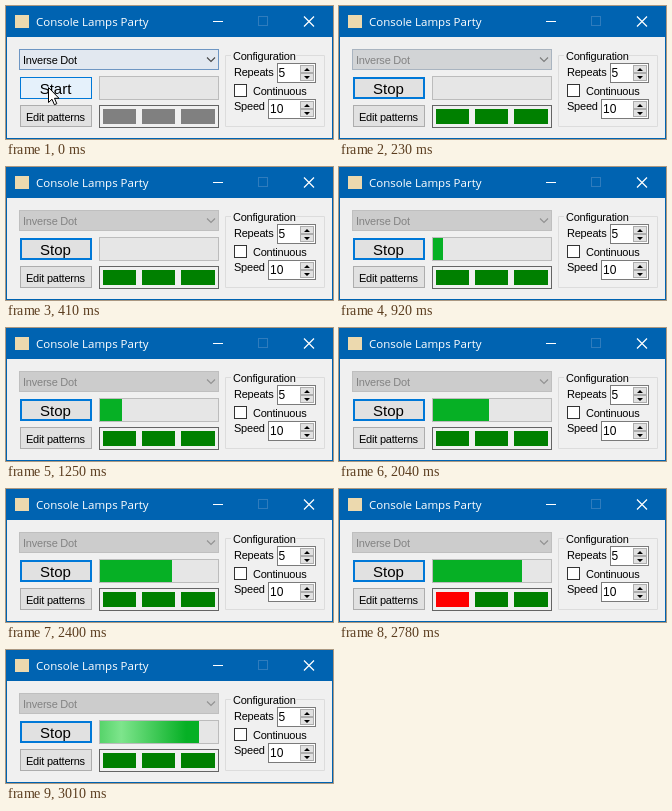
Recreate the animation shown at these times as an HTML page. Size 327 px wide and 133 px high, loop 3060 ms.

```html
<!DOCTYPE html>
<html lang="en">
<head>
<meta charset="utf-8">
<title>Console Lamps Party</title>
<style>
  html, body { margin: 0; width: 100%; height: 100%; overflow: hidden; background: #f0f0f0; }
  svg { display: block; width: 327px; height: 133px; }
  text { font: 11px "Liberation Sans", Arial, sans-serif; letter-spacing: -.22px; fill: #000; }
  .title { font: 11.5px "Open Sans", "Noto Sans", sans-serif; letter-spacing: 0; fill: #fff; }
  .run { font-size: 15px; letter-spacing: 0; text-anchor: middle; }
  .value { font-size: 12px; letter-spacing: 0; }
  .button { fill: #e1e1e1; stroke: #adadad; }
  .field { fill: #fff; stroke: #7a7a7a; }
</style>
</head>
<body>
<svg viewBox="0 0 327 133">
  <defs>
    <linearGradient id="glow">
      <stop offset="0" stop-color="#9cf2a6" stop-opacity="0"/>
      <stop offset=".5" stop-color="#9cf2a6" stop-opacity=".8"/>
      <stop offset="1" stop-color="#9cf2a6" stop-opacity="0"/>
    </linearGradient>
    <clipPath id="barClip"><rect id="barMask" x="94" y="71" width="0" height="22"/></clipPath>
    <g id="spinner">
      <rect class="button" x=".5" y=".5" width="13" height="7"/>
      <rect class="button" x=".5" y="8.5" width="13" height="7"/>
      <path d="M4 6L7 3L10 6ZM4 11L7 14L10 11Z"/>
    </g>
  </defs>

  <!-- window -->
  <rect width="327" height="133" fill="#0063b1"/>
  <rect x="1" y="31" width="325" height="101" fill="#f0f0f0"/>
  <rect x="9" y="9" width="14" height="13" fill="#ecd9ae"/>
  <text class="title" x="30" y="20">Console Lamps Party</text>
  <path d="M207 15.5H217M298 10.5L308 20.5M308 10.5L298 20.5" stroke="#fff" stroke-width="1.2" fill="none"/>
  <rect x="252.5" y="10.5" width="9" height="9" stroke="#2f7cbd" fill="none"/>

  <!-- pattern list -->
  <rect id="combo" x="13.5" y="43.5" width="199" height="20"/>
  <text id="comboText" x="17" y="58">Inverse Dot</text>
  <path id="arrow" d="M201 51.5L205 55.5L209 51.5" fill="none" stroke-width="1.1"/>

  <!-- buttons -->
  <rect id="face" x="14" y="71" width="72" height="22" fill="#0078d7"/>
  <rect id="run"/>
  <text id="runText" class="run" x="49.5" y="88"></text>
  <rect class="button" x="14.5" y="99.5" width="71" height="21"/>
  <text x="20" y="115">Edit patterns</text>

  <!-- progress -->
  <rect x="93.5" y="70.5" width="119" height="23" fill="#e6e6e6" stroke="#bcbcbc"/>
  <g clip-path="url(#barClip)">
    <rect x="94" y="71" width="118" height="22" fill="#06b025"/>
    <rect id="shine" y="71" width="130" height="22" fill="url(#glow)"/>
  </g>

  <!-- lamps -->
  <rect x="93.5" y="99.5" width="119" height="22" fill="#f0f0f0" stroke="#646464"/>
  <rect class="lamp" x="97" y="103" width="33" height="15"/>
  <rect class="lamp" x="136" y="103" width="33" height="15"/>
  <rect class="lamp" x="175" y="103" width="34" height="15"/>

  <!-- configuration -->
  <path d="M225 49.5H219.5V120.5H318.5V49.5H290" fill="none" stroke="#dcdcdc"/>
  <text x="227" y="54">Configuration</text>
  <text x="228" y="70">Repeats</text>
  <rect class="field" x="271.5" y="57.5" width="38" height="19"/>
  <text class="value" x="272.5" y="71">5</text>
  <use href="#spinner" x="294" y="59"/>
  <rect x="228.5" y="78.5" width="12" height="12" fill="#fff" stroke="#333"/>
  <text x="247" y="89">Continuous</text>
  <text x="228" y="104">Speed</text>
  <rect class="field" x="262.5" y="93.5" width="47" height="19"/>
  <text class="value" x="264" y="107">10</text>
  <use href="#spinner" x="294" y="95"/>

  <path id="pointer" d="M42.5 81.5V96.5L46 93.2L48.4 98.7L50.8 97.7L48.5 92.3H53Z" fill="#fff" stroke="#000"/>
</svg>
<script>
  const LOOP = 3060, START = 50;
  const $ = id => document.getElementById(id);
  const set = (id, name, value) => $(id).setAttribute(name, value);
  const lamps = document.querySelectorAll('.lamp');

  // Bursts of lamp steps: start, end, first step, step count
  const bursts = [
    [50, 560, 0, 11], [640, 1150, 11, 12], [1200, 1710, 23, 10],
    [1760, 2270, 33, 12], [2350, 2860, 46, 11], [2910, 3010, 57, 3]
  ];
  // Time and filled width of the progress bar
  const fill = [[690, 0], [920, 10], [1610, 35], [2040, 56], [2400, 72], [3010, 99], [3060, 101]];
  const shineStarts = [1360, 2778];

  const clamp = v => Math.max(0, Math.min(1, v));
  const mix = (a, b, p) => `rgb(${a.map((v, i) => Math.round(v + (b[i] - v) * p))})`;

  function stepAt(t) {
    const [from, to, first, count] = bursts.filter(b => b[0] <= t).pop();
    const n = Math.floor((t - from) / (to - from) * (count - 1) + .05);
    return first + Math.min(n, count - 1);
  }

  function fillAt(t) {
    const i = fill.findIndex(p => p[0] > t);
    if (i < 1) return 0;
    const [t0, w0] = fill[i - 1], [t1, w1] = fill[i];
    return w0 + (w1 - w0) * (t - t0) / (t1 - t0);
  }

  function lampColor(i, t) {
    if (t < START) return '#808080';
    return stepAt(t) % 6 === 2 * i ? '#f00' : '#008000';
  }

  function drawRunButton(running) {
    const edge = running ? 2 : 1;
    set('run', 'x', 14 + edge);
    set('run', 'y', 71 + edge);
    set('run', 'width', 72 - 2 * edge);
    set('run', 'height', 22 - 2 * edge);
    set('run', 'fill', running ? '#e1e1e1' : '#e5f1fb');
    $('runText').textContent = running ? 'Stop' : 'Start';
  }

  function draw(t) {
    const running = t >= START;
    const fade = clamp((t - START) / 250);
    set('combo', 'fill', mix([226, 232, 240], [204, 204, 204], fade));
    set('combo', 'stroke', mix([110, 150, 195], [191, 191, 191], fade));
    set('arrow', 'stroke', mix([70, 70, 70], [145, 145, 145], fade));
    $('comboText').style.fill = running ? '#838383' : '#000';
    drawRunButton(running);
    set('pointer', 'visibility', running ? 'hidden' : 'visible');

    lamps.forEach((lamp, i) => lamp.setAttribute('fill', lampColor(i, t)));

    set('barMask', 'width', Math.round(fillAt(t)));
    const begun = shineStarts.filter(s => s <= t).pop();
    set('shine', 'x', begun ? -36 + (t - begun) * .37 : -200);
  }

  const origin = performance.now();
  function tick() {
    draw((performance.now() - origin) % LOOP);
    requestAnimationFrame(tick);
  }
  tick();
</script>
</body>
</html>
```
